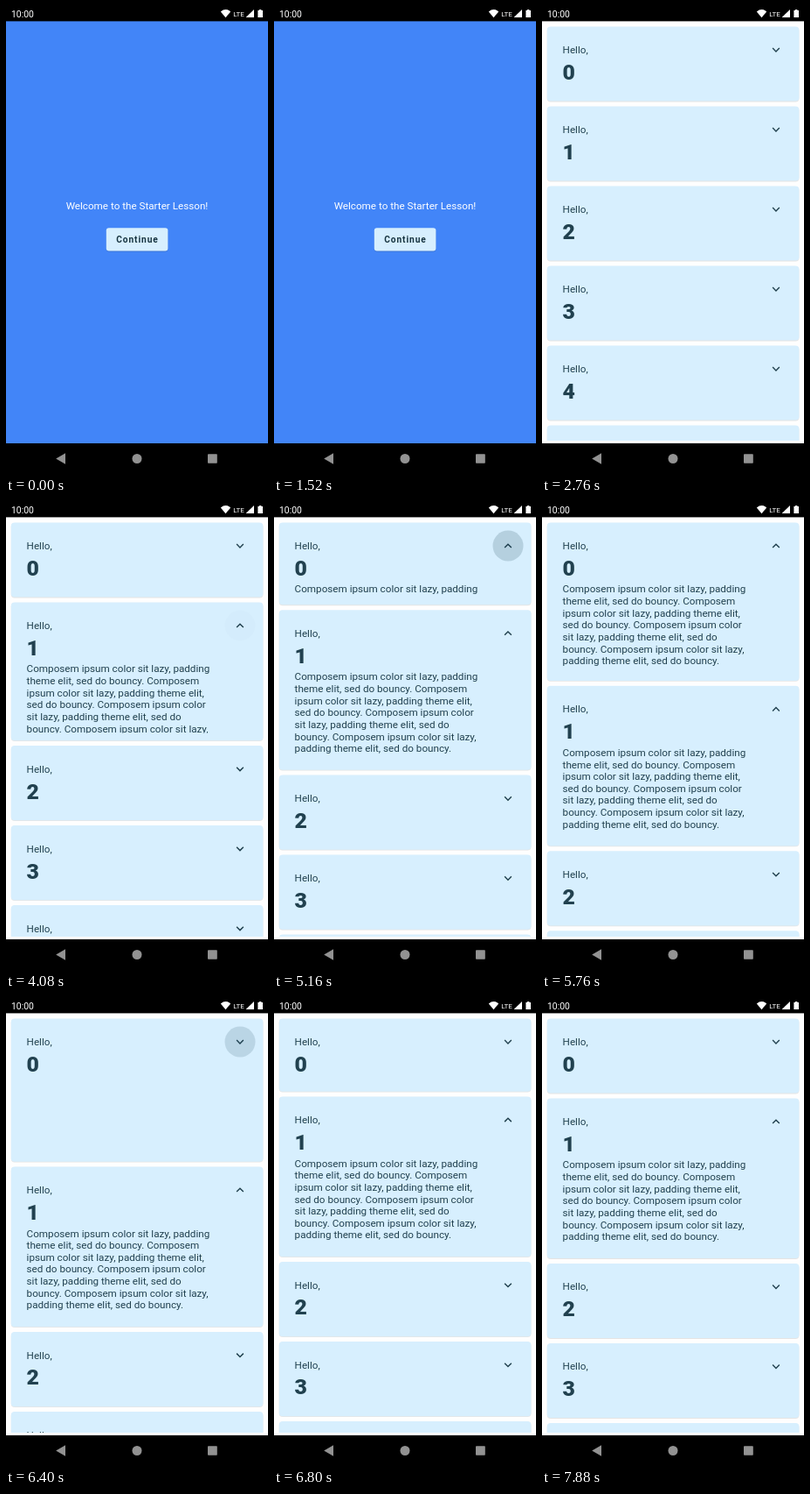
These frames come from a looping animation (300 by 534 pixels, 8560 ms). An HTML page:

```html
<!DOCTYPE html>
<html lang="en">
<head>
<meta charset="utf-8">
<title>Expandable list</title>
<style>
  html, body { margin: 0; width: 100%; height: 100%; overflow: hidden; background: #000; }
  svg { display: block; }
  text { font-family: Roboto, sans-serif; font-size: 11.68px; fill: #21414f; }
  .num { font-size: 24.8px; font-weight: 800; }
  .btn { font-size: 10.2px; font-weight: 600; letter-spacing: .91px; fill: #173440; }
  .white, .bar text { fill: #fff; }
</style>
</head>
<body>
<svg id="stage" width="300" height="534" viewBox="0 0 300 534">
  <rect width="300" height="534" fill="#fefefe"/>

  <svg id="list" y="20.4" width="300" height="475.6" viewBox="0 20.4 300 475.6"></svg>

  <g id="welcome">
    <rect y="17" width="300" height="482" fill="#4285f8"/>
    <text class="white" x="150" y="232.4" text-anchor="middle">Welcome to the Starter Lesson!</text>
    <rect x="114.8" y="254" width="70.6" height="26.6" rx="3" fill="#000" opacity=".14"/>
    <rect x="114.8" y="253.2" width="70.6" height="26.4" rx="3" fill="#d7effe"/>
    <clipPath id="btnClip"><rect x="114.8" y="253.2" width="70.6" height="26.4" rx="3"/></clipPath>
    <g clip-path="url(#btnClip)"><circle id="btnRipple" fill="#073042"/></g>
    <text class="btn" x="150.5" y="270.2" text-anchor="middle">Continue</text>
  </g>

  <g class="bar">
    <rect width="300" height="17.4" fill="#000"/>
    <text x="6" y="13" style="font-size:10.4px">10:00</text>
    <path d="M251.5 13.2L245.8 6.4Q251.5 1.8 257.2 6.4Z" fill="#fff"/>
    <text x="260.2" y="12" style="font-size:8px">LTE</text>
    <path d="M284 4V13H274.6Z" fill="#fff"/>
    <path d="M288.4 5H290V4H292.4V5H294V13H288.4Z" fill="#fff"/>
  </g>

  <g fill="#929292">
    <rect y="499" width="300" height="35" fill="#000"/>
    <path d="M57.2 516.5L68 510.3V522.7Z"/>
    <circle cx="150" cy="516.5" r="5.5"/>
    <rect x="231" y="511.2" width="10.8" height="10.6" rx=".8"/>
  </g>
</svg>

<script>
const LOOP = 8560, CUT = 2400;
const FIRST_TOP = 23.4, CLOSED = 85.2, GROW = 97.5, GAP = 5.8, PAD = 8.75;
const OMEGA = 12.45, ZETA = 0.5;
const INK = '#21414f', PRESS_ALPHA = 0.22;
const DOWN = 'M16.59 8.59L12 13.17 7.41 8.59 6 10l6 6 6-6z';
const UP = 'M12 8l-6 6 1.41 1.41L12 10.83l4.59 4.58L18 14z';
const LINES = [
  'Composem ipsum color sit lazy, padding',
  'theme elit, sed do bouncy. Composem',
  'ipsum color sit lazy, padding theme elit,',
  'sed do bouncy. Composem ipsum color',
  'sit lazy, padding theme elit, sed do',
  'bouncy. Composem ipsum color sit lazy,',
  'padding theme elit, sed do bouncy.'
];
// Taps on the chevrons: finger down, finger up
const TAPS = [
  { card: 1, down: 3670, up: 3939, open: true },
  { card: 0, down: 4850, up: 5124, open: true },
  { card: 0, down: 6070, up: 6343, open: false }
];

const byId = id => document.getElementById(id);
const clamp = v => Math.max(0, Math.min(1, v));

function set(node, attrs) {
  for (const k in attrs) node.setAttribute(k, attrs[k]);
  return node;
}

function add(parent, tag, attrs, text) {
  const node = document.createElementNS('http://www.w3.org/2000/svg', tag);
  if (text !== undefined) node.textContent = text;
  return parent.appendChild(set(node, attrs));
}

// Progress of an underdamped spring from 0 to 1
function spring(ms) {
  if (ms <= 0) return 0;
  const t = ms / 1000, root = Math.sqrt(1 - ZETA * ZETA), a = OMEGA * root * t;
  return 1 - Math.exp(-ZETA * OMEGA * t) * (Math.cos(a) + ZETA / root * Math.sin(a));
}

function ripple(node, t, down, up, from, to) {
  const p = clamp((t - down) / 225);
  const alpha = PRESS_ALPHA * clamp((t - down) / 75) * (1 - clamp((t - up) / 150));
  set(node, { r: from + (to - from) * (1 - (1 - p) ** 3), opacity: alpha });
  return p;
}

function makeCard(i) {
  const g = add(byId('list'), 'g', {});
  const box = { x: 5.8, width: 288.6, rx: 4 };
  const shade = add(g, 'rect', { ...box, y: 0.8, fill: '#000', opacity: 0.1 });
  const face = add(g, 'rect', { ...box, fill: '#d7effe' });
  const body = add(g, 'svg', { width: 300 });
  add(body, 'text', { x: 23.6, y: 30.6 }, 'Hello,');
  add(body, 'text', { x: 23.4, y: 60.5, class: 'num' }, i);
  const copy = add(body, 'g', {});
  LINES.forEach((s, n) => add(copy, 'text', { x: 23.6, y: 80.1 + n * 13.65 }, s));
  const icon = add(body, 'path', { transform: 'translate(259.2 17.9) scale(.73)', fill: INK });
  const press = add(g, 'circle', { cx: 268, cy: 26.6, fill: '#073042' });
  return { g, shade, face, body, copy, icon, press };
}

const cards = Array.from({ length: 6 }, (_, i) => makeCard(i));

function draw(t) {
  const welcome = t < CUT;
  byId('welcome').style.display = welcome ? '' : 'none';
  const p = ripple(byId('btnRipple'), t, 1520, CUT, 21, 44.8);
  set(byId('btnRipple'), { cx: 145 + 5 * p, cy: 266.4 });

  let top = FIRST_TOP;
  cards.forEach((c, i) => {
    let size = 0, open = false;
    set(c.press, { opacity: 0 });
    for (const tap of TAPS) {
      if (tap.card !== i || t < tap.down) continue;
      ripple(c.press, t, tap.down, tap.up, 10.5, 17.5);
      if (t < tap.up) continue;
      open = tap.open;
      size += (open ? 1 : -1) * spring(t - tap.up);
    }
    const h = CLOSED + GROW * size;
    set(c.g, { transform: `translate(0 ${top})` });
    set(c.shade, { height: h });
    set(c.face, { height: h });
    set(c.body, { height: h - PAD });
    set(c.icon, { d: open ? UP : DOWN });
    c.copy.style.display = open ? '' : 'none';
    top += h + GAP;
  });
}

const start = performance.now();
function tick() {
  draw((performance.now() - start) % LOOP);
  requestAnimationFrame(tick);
}
tick();
</script>
</body>
</html>
```
